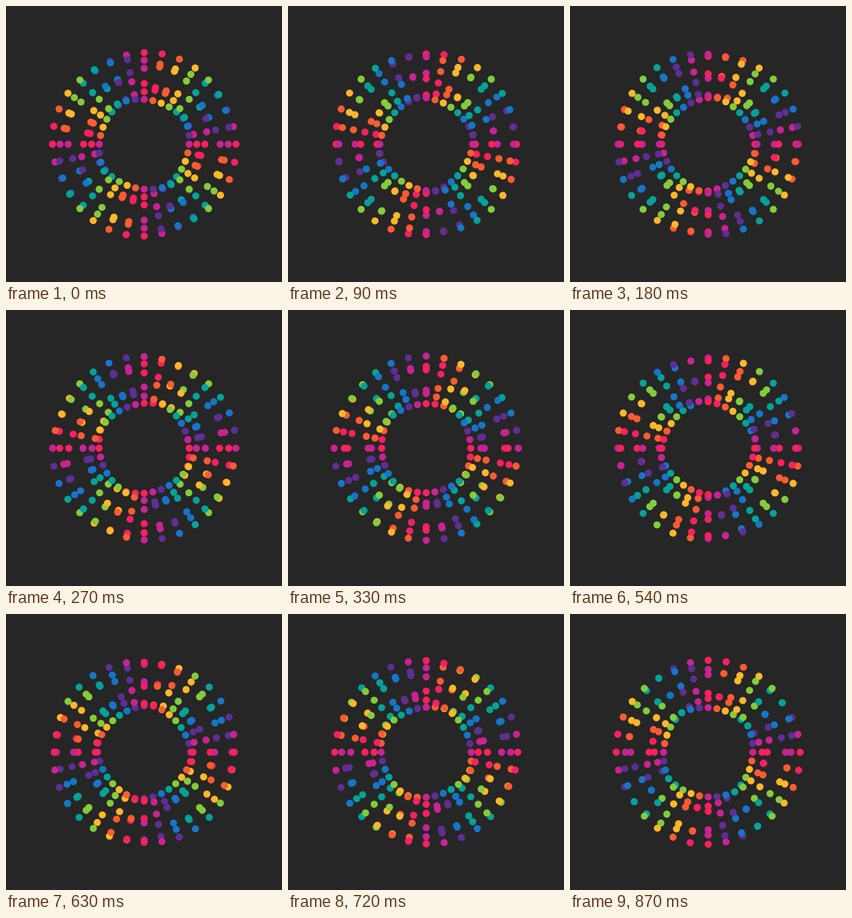
Recreate the animation shown at these times as an HTML page with a canvas. Size 400 by 400 pixels, loop 0.9 s.

```html
<!DOCTYPE html>
<html lang="en">
<head>
<meta charset="utf-8">
<title>Dot ring</title>
<style>
html, body { margin: 0; height: 100%; overflow: hidden; background: #262626; }
canvas { display: block; }
</style>
</head>
<body>
<canvas id="stage" width="400" height="400"></canvas>
<script>
const ctx = document.getElementById('stage').getContext('2d');
const COLORS = ['#f8215f', '#fa5b32', '#feb72b', '#82cc3c', '#06a297', '#1775c8', '#5e2f92', '#c92392'];
const SPOKES = 32, DOTS = 6, CENTER = 200.3;
const MID = 99, SWING = 34.6, DOT = 5.2;
const LOOP = 900, STEP = 30;
const rad = deg => deg * Math.PI / 180;

function drawDot(angle, phase, color) {
  const r = MID + SWING * Math.cos(rad(phase));
  ctx.fillStyle = color;
  ctx.beginPath();
  ctx.arc(CENTER + r * Math.sin(angle), CENTER - r * Math.cos(angle), DOT, 0, 2 * Math.PI);
  ctx.fill();
}

function drawSpoke(spoke, turn) {
  const angle = spoke * 2 * Math.PI / SPOKES;
  const n = spoke % 8 || 8;
  const dots = [];
  for (let i = 0; i < DOTS; i++) {
    const phase = (turn - 7.5 * n + 60 * i + 720) % 360;
    dots.push({ phase, color: COLORS[(n + 7 + i % 2) % 8] });
  }
  // Outward-moving dots (phase above 180) pass in front.
  dots.sort((a, b) => a.phase - b.phase);
  for (const { phase, color } of dots) drawDot(angle, phase, color);
}

function frame() {
  const time = performance.now() % LOOP;
  const turn = 11.3 + 120 * Math.floor(time / STEP) * STEP / LOOP;
  ctx.fillStyle = '#262626';
  ctx.fillRect(0, 0, 400, 400);
  for (let s = 0; s < SPOKES; s++) drawSpoke(s, turn);
  requestAnimationFrame(frame);
}
frame();
</script>
</body>
</html>
```
